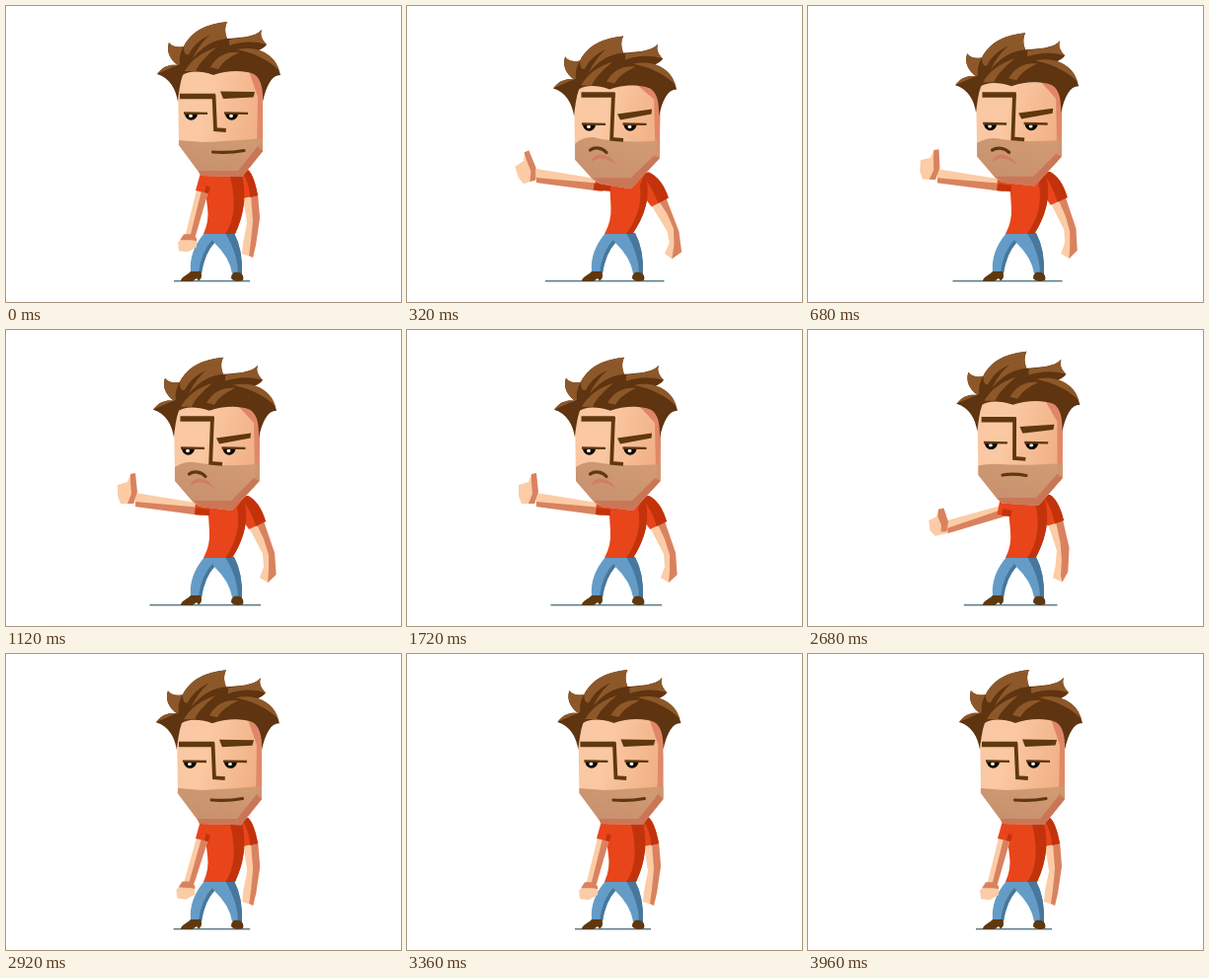
An HTML page for the animation above (4 s loop, 400 by 300 pixels).

```html
<!DOCTYPE html>
<html lang="en">
<head>
<meta charset="utf-8">
<style>
  html, body { margin: 0; width: 100%; height: 100%; overflow: hidden; background: #fff; }
  svg { display: block; width: 100vw; height: 100vh; }
</style>
</head>
<body>
<svg id="stage" viewBox="0 0 400 300">
  <defs>
    <linearGradient id="skin" x1="0" y1="0" x2="1" y2=".35">
      <stop offset="0" stop-color="#f9c7a2"/><stop offset=".4" stop-color="#fac8a2"/><stop offset="1" stop-color="#f1b085"/>
    </linearGradient>
    <linearGradient id="beard" x1="0" y1="1" x2="1" y2="0">
      <stop offset="0" stop-color="#bf8867"/><stop offset="1" stop-color="#cf9a72"/>
    </linearGradient>
    <linearGradient id="cheek" x1="0" y1="0" x2="0" y2="1">
      <stop offset="0" stop-color="#e08468"/><stop offset=".6" stop-color="#e08a68"/><stop offset="1" stop-color="#c9785a"/>
    </linearGradient>
  </defs>
</svg>
<script>
const stage = document.getElementById('stage');
const SKIN = '#fbcca6', SKIN_SHADE = '#d98260', RED = '#e8451b', RED_SHADE = '#c2330c';
const BLUE = '#659cc7', BLUE_SHADE = '#47779c', BROWN = '#5f3410', HAIR = '#8d5829', INK = '#5f380f';
const morphs = [];

function make(tag, parent, attrs = {}) {
  const el = document.createElementNS('http://www.w3.org/2000/svg', tag);
  for (const key in attrs) el.setAttribute(key, attrs[key]);
  return parent.appendChild(el);
}
const group = parent => make('g', parent);

// A path that blends from its resting outline to its raised outline.
function shape(parent, fill, rest, raised = rest, attrs = {}) {
  const el = make('path', parent, { fill, d: rest, ...attrs });
  if (raised !== rest) {
    const ends = raised.match(/-?[\d.]+/g).map(Number);
    morphs.push({ el, rest, ends, pace: attrs.class || 'body' });
  }
  return el;
}
const line = (parent, width, rest, raised, attrs) =>
  shape(parent, 'none', rest, raised, { stroke: INK, 'stroke-width': width, class: 'face', ...attrs });

// Ground and far arm
shape(stage, 'none', 'M170 278.7L247 278.7', 'M145.5 278.7L258 278.7', { stroke: '#607f87', 'stroke-width': 1.6 });
shape(stage, SKIN,
  'M240 192L255 191L257 215L253 242L250 255L239 251L240 240L244 220Z',
  'M246 200L261 194L272 226L273.5 248L265 256L257 251L261 240L260 227Z');
shape(stage, SKIN_SHADE,
  'M248 192L255 191L257 215L253 242L250 255L246 253L248 238L250 218Z',
  'M254 197L261 194L272 226L273.5 248L265 256L266 244L266 228L261 212Z');
shape(stage, RED,
  'M234 166L245 166Q251 171 255 192L239 195L233 180Z',
  'M234 170L245 168Q257 174 263 194L246 202L235 186Z');
shape(stage, RED_SHADE,
  'M238 166L245 166Q251 171 255 192L247 194Q247 180 238 166Z',
  'M237 169L245 168Q257 174 263 194L253 199Q248 182 237 169Z');

// Legs and shoes
shape(stage, BLUE, 'M201 230L231 230Q240 247 239 272L229 271Q226 254 211 240Q201 251 198 271L187 269Q185 249 201 230Z');
shape(stage, BLUE_SHADE, 'M222 230L231 230Q240 247 239 272L235 272Q235 251 222 230Z');
shape(stage, BLUE_SHADE, 'M211 240Q201 251 198 271L195 270Q198 248 209 237Z');
shape(stage, INK, 'M177 279C177 274 184 273 187 269L197 269C199 273 198 277 195 278.5L193 276L189 279Z');
shape(stage, INK, 'M228 276C228 270 232 269 236 270C240 271 241 275 240 278C236 279.5 230 279.5 228 276Z');

// Torso
shape(stage, RED,
  'M197 169L238 168C244 188 242 210 232 231L200 231Q206 218 204 204L202 188Z',
  'M201 180L240 169C248 190 240 214 229 231L200 231Q207 218 206 204L205 188Z');
shape(stage, RED_SHADE,
  'M226 169L238 168C244 188 242 210 232 231L222 231Q237 210 226 169Z',
  'M234 180L240 169C248 192 240 214 229 231L222 231Q239 207 234 180Z');

// Near arm: forearm turns about the shoulder, the hand follows the wrist
const forearm = group(stage);
const armPace = { class: 'arm' }, facePace = { class: 'face' };
shape(forearm, SKIN, 'M2 -6L-46 -11L-47 -1L2 6Z', 'M2 -5L-65 -16L-65 -2L2 7Z', armPace);
shape(forearm, SKIN_SHADE, 'M2 -1L-46 -6L-47 -1L2 6Z', 'M2 -1L-65 -7L-65 -2L2 7Z', armPace);
shape(stage, RED,
  'M197 169L206 173L205 190L192 187Z',
  'M192 174L206 178L206 188L191 187Z');
shape(stage, RED_SHADE,
  'M203 182L207 184L205 190L201 189Z',
  'M192 180L206 182L206 188L191 187Z');
const hand = group(stage);
shape(hand, SKIN,
  'M-12 6L-9 4L-4 -2L2 -1L7 4L7 11L-2 16L-11 15Z',
  'M-18 -15L-8 -18L-5 -26L0 -26L1 -8L-1 4L-15 4L-18 -4Z', armPace);
shape(hand, SKIN_SHADE,
  'M-10 4L-6 -2L1 -2L7 2L7 5L2 4L-4 4Z',
  'M-5 -18L-5 -26L0 -27L2 -8L-2 4L-8 4L-4 -6Z', armPace);

// Head
const head = group(stage);
shape(head, 'url(#skin)',
  'M174 66L175 141L195 168L197 172L239 173L260 147L260 104L259 66Z',
  'M170 78L171 153L190 175L197 179L229 183L256.5 153L257 104L255 78Z');
shape(head, 'url(#cheek)',
  'M246 66L259 66L260 104L260 147L239 173L236 168L254 143L255 92Z',
  'M236 78L255 78L257 104L256.5 153L229 183L228 180L252 149L251 94Z');
shape(head, 'url(#beard)',
  'M175 136Q187 137 200 138Q225 137 260 134L260 147L239 173L197 172L195 168L175 141Z',
  'M171 139Q180 133 191 134Q214 139 257 136L256.5 153L229 183L197 179L190 175L171 153Z', { opacity: .9 });
shape(head, '#c97254',
  'M255 142L260 147L239 173L197 172L195 167L235 167Z',
  'M251 150L256.5 153L229 183L197 179L190 173L228 173Z', { opacity: .85 });

// Face
line(head, 5.5, 'M176 91.5L212 91.5', 'M176.5 90L210.5 90');
line(head, 3.8, 'M210.5 90L212 125.2L222.8 126', 'M209 88L207.2 134.8L219 135.8');
shape(head, INK, 'M217 86.5L252 87L250.5 92.5L220 94Z', 'M213 109.5L248 104.5L247.5 109.5L216 115.5Z', facePace);
function eye(rest, raised) {
  const at = ([x, y]) => `M${x} ${y}L${x + 13} ${y}C${x + 13} ${y + 9.5} ${x} ${y + 9.5} ${x} ${y}Z`;
  const lid = ([x, y]) => `M${x - 1} ${y}L${x + 23} ${y + .4}`;
  const glint = ([x, y]) => `M${x + 5.5} ${y + 3}L${x + 6.5} ${y + 3}`;
  shape(head, '#080604', at(rest), at(raised), facePace);
  line(head, 2.4, lid(rest), lid(raised));
  line(head, 2.8, glint(rest), glint(raised), { stroke: '#fff', 'stroke-linecap': 'round' });
}
eye([181, 108.5], [178, 119.5]);
eye([222, 108.5], [219.5, 119.5]);
const lip = shape(head, '#d07f62', 'M187 158C188 147 206 148 211 161C203 154 195 152 187 158Z');
line(head, 3.2, 'M209.5 148C218 148.8 230 148.5 241 146.5', 'M185.5 146C190 142.5 198 143.5 202 148.5', { 'stroke-linecap': 'round' });

// Hair: a dark mass with lighter locks
const hair = group(head);
shape(hair, BROWN, `M174 97C172 84 166 73 153 69C159 61 166 59 174 60C166 54 162 46 165 37
  C169 42 174 42 180 41C188 25 204 18 224 16C221 22 222 28 224 33C236 32 252 32 259 24
  C257 29 259 34 264 39C262 42 259 43 256 45C269 49 275 58 278 70C269 70 264 80 260 97
  C260 84 259 74 251 69C238 64 222 66 210 70C196 65 184 66 179 70C176 78 175 88 174 97Z`);
[
  'M180 41C188 25 204 18 224 16C221 22 222 28 224 33C210 34 198 42 189 53C194 42 200 35 207 29C196 34 190 40 185 49C182 50 180 48 180 41Z',
  'M165 37C169 42 174 42 180 41C177 46 175 52 176 59L174 60C166 54 162 46 165 37Z',
  'M226 34C238 32 252 32 259 24C257 29 259 34 264 39C250 35 238 36 226 40Z',
  'M234 44C254 40 272 48 277 66C267 55 252 48 234 44Z',
  'M181 66C188 54 198 47 213 42C204 50 196 57 192 66Z',
  'M207 62C214 50 224 46 236 47C226 52 219 57 215 64Z',
  'M153 69C159 61 166 59 174 60C168 62 160 66 153 69Z'
].forEach(d => shape(hair, HAIR, d));

const clamp = (x, lo = 0, hi = 1) => Math.min(hi, Math.max(lo, x));
const mix = (a, b, p) => a + (b - a) * p;
const smooth = x => x * x * (3 - 2 * x);

// Springs up to the raised pose, later eases back to rest.
function poseAt(t) {
  const s = Math.max(0, t - .03), w = Math.PI / .3, decay = 5;
  const spring = 1 - Math.exp(-decay * s) * (Math.cos(w * s) + decay / w * Math.sin(w * s));
  return spring * (1 - smooth(clamp((t - 2.4) / .56)));
}

function draw(t) {
  const body = poseAt(t), face = clamp(body), arm = Math.sin(face * Math.PI / 2);
  const paces = { body, face, arm };
  for (const { el, rest, ends, pace } of morphs) {
    let i = 0;
    el.setAttribute('d', rest.replace(/-?[\d.]+/g, n => mix(+n, ends[i++], paces[pace]).toFixed(2)));
  }
  const sx = mix(199, 196, arm), sy = mix(188, 181, arm), turn = -82 * (1 - arm);
  const a = turn * Math.PI / 180, wx = mix(-46.5, -65, arm), wy = mix(-6.5, -9, arm);
  const handX = sx + wx * Math.cos(a) - wy * Math.sin(a);
  const handY = sy + wx * Math.sin(a) + wy * Math.cos(a);
  const flick = Math.sin(Math.PI * clamp((t - 2.36) / .36));
  const lean = arm * -75 * Math.max(body - 1, -.06) - 28 * flick;
  forearm.setAttribute('transform', `translate(${sx} ${sy}) rotate(${turn})`);
  hand.setAttribute('transform', `translate(${handX} ${handY}) rotate(${lean})`);
  hair.setAttribute('transform', `translate(${-4 * body} ${11.8 * body})`);
  lip.setAttribute('opacity', clamp((body - .5) * 2.5));
  const sway = -smooth(clamp((t - 2.4) / .5)) * (1 - smooth(clamp(t - 2.92)));
  head.setAttribute('transform', `translate(${sway} 0)`);
}

function tick() {
  draw(performance.now() % 4000 / 1000);
  requestAnimationFrame(tick);
}
tick();
</script>
</body>
</html>
```
